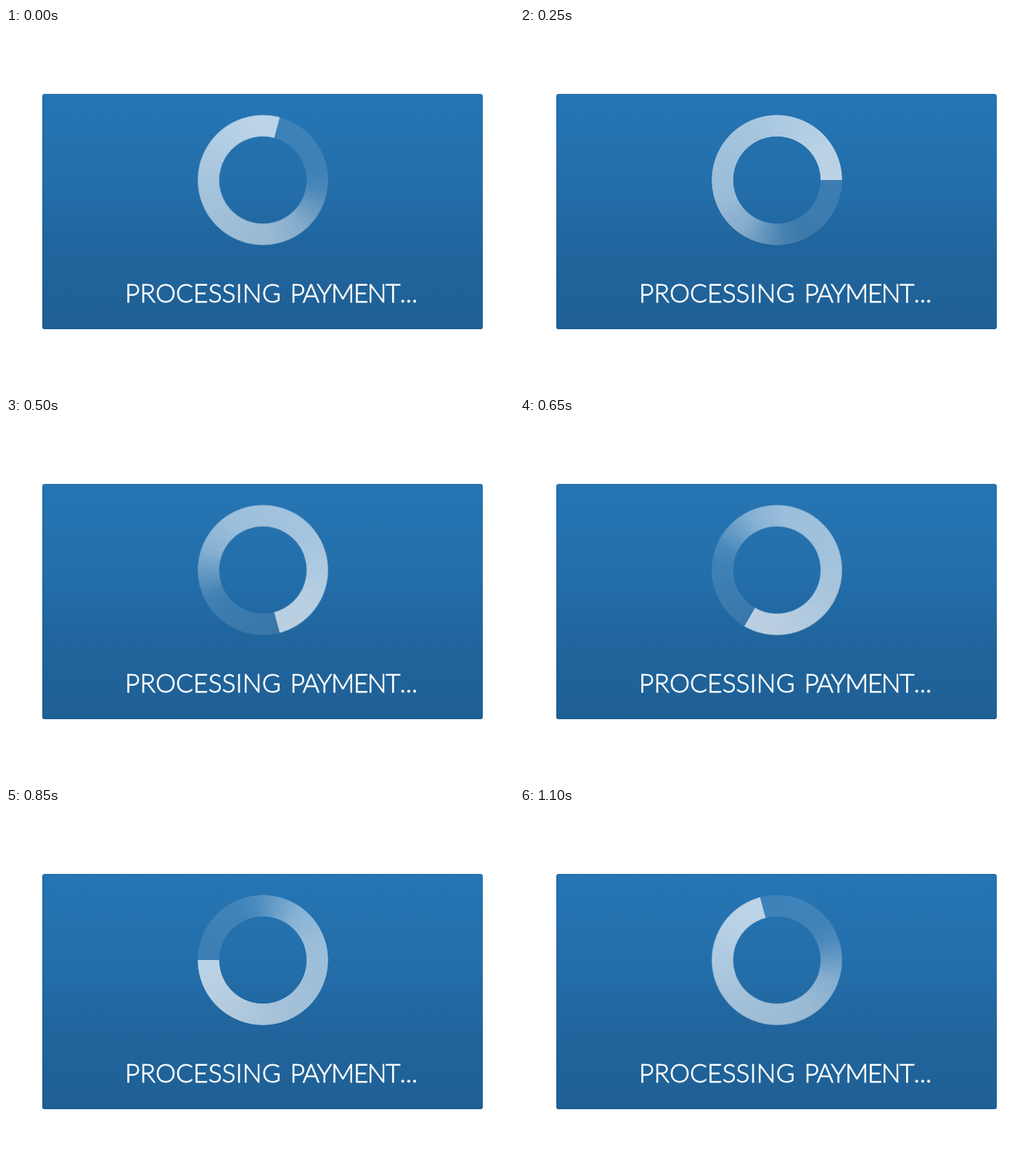
Animation, 700 px wide and 500 px high, one loop 1150 ms. Source, as an HTML page:

```html
<!DOCTYPE html>
<html lang="en">
<head>
<meta charset="utf-8">
<title>Processing payment</title>
<style>
  html, body {
    margin: 0;
    width: 100%;
    height: 100%;
    overflow: hidden;
    background: #fff;
  }
  .panel {
    position: absolute;
    left: 50px;
    top: 91px;
    width: 607px;
    height: 325px;
    border-radius: 3.5px;
    background: linear-gradient(#2675b4, #236eaa 40%, #20659d 65%, #1f6095);
    box-shadow: inset 0 -2px 1px #1c5a8d80, inset 2px 0 2px #1c5a8d40;
  }
  .ring {
    --band: radial-gradient(circle, transparent 59.8px, #000 60.6px, #000 89.3px, transparent 90.1px);
    position: absolute;
    left: 263px;
    top: 119px;
    width: 182px;
    height: 182px;
    background: conic-gradient(
      rgb(255 255 255 / .105) 0deg,
      rgb(255 255 255 / .125) 65deg,
      rgb(255 255 255 / .17) 82deg,
      rgb(255 255 255 / .45) 126deg,
      rgb(255 255 255 / .54) 160deg,
      rgb(255 255 255 / .59) 250deg,
      rgb(255 255 255 / .68) 325deg,
      rgb(255 255 255 / .69) 360deg);
    -webkit-mask: var(--band);
    mask: var(--band);
    animation: turn 1150ms steps(23, end) infinite;
  }
  /* 23 poses, 15 degrees apart, from 15 to 345 */
  @keyframes turn {
    from { transform: rotate(15deg); }
    to { transform: rotate(360deg); }
  }
  svg {
    position: absolute;
    left: 0;
    top: 0;
  }
  text {
    font: 300 35.5px Lato, "Open Sans", sans-serif;
    fill: #fff;
    stroke: #fff;
    stroke-width: .8px;
  }
  .tight { letter-spacing: -1.5px; }
</style>
</head>
<body>
  <div class="panel"></div>
  <div class="ring"></div>
  <svg width="700" height="500">
    <text y="379"><tspan x="164">PROCESSING</tspan> <tspan class="tight" x="391.5">PAYMENT</tspan><tspan x="542.5">...</tspan></text>
  </svg>
</body>
</html>
```
